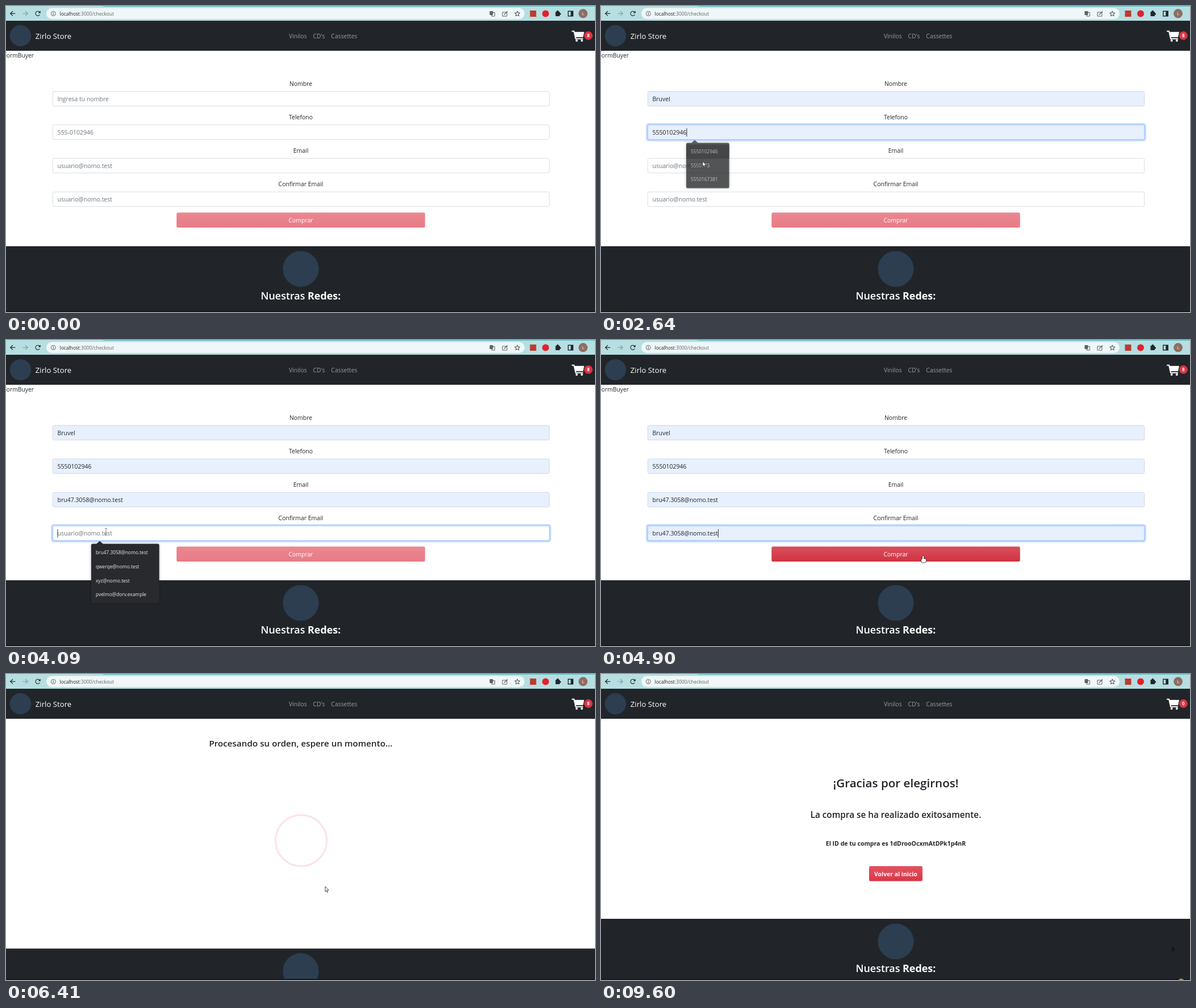
Recreate the animation shown at these times as an HTML page with a canvas. Size 1037 by 540 pixels, loop 9730 ms.

```html
<!DOCTYPE html>
<html lang="es">
<head>
<meta charset="utf-8">
<title>Checkout</title>
<style>
  html, body { margin: 0; width: 100%; height: 100%; overflow: hidden; background: #fff; }
  canvas { display: block; }
</style>
</head>
<body>
<canvas id="stage" width="1037" height="540"></canvas>
<script>
const ctx = document.getElementById('stage').getContext('2d');
const LOOP = 9730, WIDTH = 1037, HEIGHT = 540, CENTER = 519;
const FONT = '"Open Sans", "Noto Sans", sans-serif';
const DARK = '#212529', RED = '#dc3545', DISC = '#2c3e50', INK = '#20282b', SOFT = '#5f6368';
const LOADING_AT = 5400, DONE_AT = 6630, GONE_AT = 9400;
const INPUT = { x: 82, w: 875, h: 26.4 };
const MENU = { x: 150, row: 24.7, pad: 3, size: 8.35 };
const BUY = { x: 300.3, y: 364.5, w: 437.5, h: 26.5 };
const BACK = { x: 472, y: 339, w: 94, h: 26.5 };

const clamp = v => Math.max(0, Math.min(1, v));
const mix = (a, b, k) => a + (b - a) * k;
const between = (t, on, off, ms) => Math.min(clamp((t - on) / ms), 1 - clamp((t - off) / ms));
const inside = (p, b) => p.x >= b.x && p.x <= b.x + b.w && p.y >= b.y && p.y <= b.y + b.h;

function bezier(x1, y1, x2, y2) {
  const at = (s, a, b) => 3 * (1 - s) * (1 - s) * s * a + 3 * (1 - s) * s * s * b + s * s * s;
  return x => {
    let lo = 0, hi = 1;
    for (let i = 0; i < 24; i++) {
      const mid = (lo + hi) / 2;
      if (at(mid, x1, x2) < x) lo = mid; else hi = mid;
    }
    return at(lo, y1, y2);
  };
}
const growEase = bezier(0.165, 0.84, 0.44, 1);
const fadeEase = bezier(0.3, 0.61, 0.355, 1);

function rect(x, y, w, h, color, r = 0) {
  ctx.fillStyle = color;
  ctx.beginPath();
  ctx.roundRect(x, y, w, h, r);
  ctx.fill();
}

function frame(x, y, w, h, color, width, r = 0) {
  ctx.strokeStyle = color;
  ctx.lineWidth = width;
  ctx.beginPath();
  ctx.roundRect(x, y, w, h, r);
  ctx.stroke();
}

function circle(x, y, r, color) {
  ctx.fillStyle = color;
  ctx.beginPath();
  ctx.arc(x, y, r, 0, Math.PI * 2);
  ctx.fill();
}

function ring(x, y, r, color, width, from = 0, to = Math.PI * 2) {
  ctx.strokeStyle = color;
  ctx.lineWidth = width;
  ctx.beginPath();
  ctx.arc(x, y, r, from, to);
  ctx.stroke();
}

function trace(points, close) {
  ctx.beginPath();
  for (let i = 0; i < points.length; i += 2) ctx.lineTo(points[i], points[i + 1]);
  if (close) ctx.closePath();
}

function line(points, color, width = 1.2, close = false) {
  trace(points, close);
  ctx.strokeStyle = color;
  ctx.lineWidth = width;
  ctx.stroke();
}

function shape(points, color) {
  trace(points, true);
  ctx.fillStyle = color;
  ctx.fill();
}

// Draws a string and returns its width
function text(str, x, y, size, color, { align = 'left', weight = 400, font = FONT } = {}) {
  ctx.font = `${weight} ${size}px ${font}`;
  ctx.textAlign = align;
  ctx.fillStyle = color;
  ctx.fillText(str, x, y);
  return ctx.measureText(str).width;
}

const centered = (str, y, size, weight, color = DARK) =>
  text(str, CENTER, y, size, color, { align: 'center', weight });

function menuBox(options, inputY) {
  ctx.font = `${MENU.size}px ${FONT}`;
  const widest = Math.max(...options.map(o => ctx.measureText(o).width));
  return { x: MENU.x, y: inputY + 32, w: widest + 28, h: options.length * MENU.row + 2 * MENU.pad };
}

const mails = ['bru47.3058@nomo.test', 'qwerqe@nomo.test', 'xyz@nomo.test', 'pvelmo@dorv.example'];
const mailHint = 'usuario@nomo.test';

// Fields are filled one after another at a steady pace
const fields = [
  { label: 'Nombre', hint: 'Ingresa tu nombre', options: ['Bruvel', 'das', 'Nombre1', 'adasda'] },
  { label: 'Telefono', hint: '555-0102946', options: ['5550102946', '5550173', '5550167381'] },
  { label: 'Email', hint: mailHint, options: mails },
  { label: 'Confirmar Email', hint: mailHint, options: mails }
].map((f, i, all) => {
  const y = 150.4 + 59.1 * i, pick = 1540 + 1030 * i, focus = pick - 690;
  const blur = i < all.length - 1 ? focus + 1030 : LOOP;
  return { ...f, y, pick, focus, blur, box: { ...INPUT, y }, menu: menuBox(f.options, y) };
});
const lastPick = fields.at(-1).pick;

// Where the mouse rests: arrival, departure, x, y
const stops = [
  [140, 140, 795, 470], [360, 360, 480, 130], [590, 790, 296, 162],
  ...fields.flatMap((f, i) => [
    [i ? fields[i - 1].pick + 100 : f.focus + 150, f.focus + 150, 176, f.y + 10],
    [f.pick - 200, f.pick, 186, f.menu.y + 22]
  ]),
  [4900, 5300, 567, 381], [5580, DONE_AT, 562, 375], [7170, 7630, 588, 398],
  [8000, 8720, 522, 352], [GONE_AT, LOOP, 1005, 480]
];

function mouseAt(t) {
  const i = stops.findIndex(s => t < s[1]);
  const [arrive, , x, y] = stops[i];
  if (i === 0) return { x: -50, y: -50 };
  const [, leave, x0, y0] = stops[i - 1];
  const k = clamp((t - leave) / (arrive - leave));
  return { x: mix(x0, x, k), y: mix(y0, y, k) };
}

function chevron(x, dir, color) {
  line([x - 4.3 * dir, 13.3, x + 4.3 * dir, 13.3], color);
  line([x, 9.2, x + 4.3 * dir, 13.3, x, 17.4], color);
}

function drawStar(x, y, r) {
  const points = [];
  for (let i = 0; i < 10; i++) {
    const a = i * Math.PI / 5 - Math.PI / 2, d = i % 2 ? r * 0.43 : r;
    points.push(x + d * Math.cos(a), y + d * Math.sin(a));
  }
  line(points, '#3c4043', 1, true);
}

function drawBrowser() {
  rect(0, 0, WIDTH, 26, '#b7dee1');
  rect(171, 0, WIDTH - 171, 1, '#55b9c0');
  rect(71, 3.5, 842, 19.5, '#eff7f8', 9.75);

  chevron(12, -1, INK);
  chevron(34, 1, '#83a0a3');
  ring(56, 13.3, 3.9, INK, 1.2, 0.5, 5.6);
  shape([60.8, 8.6, 60.8, 12.6, 56.8, 12.6], INK);

  ring(83.3, 13.4, 4, SOFT, 1);
  text('i', 83.3, 16.1, 7, SOFT, { align: 'center', weight: 700 });
  const host = text('localhost', 94.5, 16.8, 8.45, '#202124');
  text(':3000/checkout', 94.5 + host, 16.8, 8.45, SOFT);

  frame(855, 11.5, 5.5, 6.5, SOFT, 1);
  rect(851.5, 9, 6, 7, SOFT, 1);
  frame(874, 11, 8, 7, SOFT, 1);
  line([877, 15.5, 883, 9.5], SOFT);
  drawStar(900.3, 13.8, 4.9);

  rect(922.5, 8, 11, 11, '#bd3a2f');
  circle(950, 13.4, 6, '#e2202c');
  rect(967.5, 10, 7.5, 8, INK, 1);
  circle(971.3, 9.6, 1.8, INK);
  circle(975.3, 14, 1.8, INK);
  frame(989.8, 9.3, 8.4, 8.4, INK, 1.4);
  rect(994.3, 9, 4, 9, INK);
  circle(1016, 13.3, 8, '#8d6e63');
  text('L', 1016, 16.4, 8, '#fff', { align: 'center' });
}

function drawNavbar(count) {
  rect(0, 26, WIDTH, 53, DARK);
  circle(25.5, 52.5, 18.7, DISC);
  text('Zirlo Store', 51.8, 58.2, 13.2, '#fff');
  let x = 498;
  for (const link of ['Vinilos', 'CD\'s', 'Cassettes']) x += text(link, x, 57.2, 10.4, '#9b9d9f') + 10.8;

  line([996, 44.4, 1000, 44.4, 1003, 57.8, 1016, 57.8], '#fff', 2);
  shape([1000.5, 45.8, 1018, 45.8, 1016, 55, 1002.4, 55], '#fff');
  circle(1004.7, 61, 2, '#fff');
  circle(1013.8, 61, 2, '#fff');
  circle(1025.3, 52.3, 7.5, RED);
  text(count, 1025.3, 55.3, 8, '#fff', { align: 'center', weight: 700 });
}

function drawFooter(y) {
  rect(0, y, WIDTH, HEIGHT - y, DARK);
  circle(CENTER, y + 40, 31.6, DISC);
  const w = text('Nuestras ', 448.5, y + 93.5, 17.9, '#fff', { weight: 600 });
  text('Redes:', 448.5 + w, y + 93.5, 17.9, '#fff', { weight: 700 });
}

function drawButton({ x, y, w, h }, label, weight, hover, enabled = true) {
  ctx.globalAlpha = enabled ? 1 : 0.65;
  rect(x, y, w, h, RED, 2.8);
  rect(x, y, w, h, `rgba(0,0,0,${0.15 * hover})`, 2.8);
  const shine = ctx.createLinearGradient(0, y, 0, y + h);
  shine.addColorStop(0, 'rgba(255,255,255,.15)');
  shine.addColorStop(1, 'rgba(255,255,255,0)');
  rect(x, y, w, h, shine, 2.8);
  ctx.globalAlpha = 1;
  centered(label, y + 17.6, 10.4, weight, '#fff');
}

const menuAlpha = (f, t) => t < f.focus + 90 ? 0 : 1 - clamp((t - f.pick) / 250);

// Highlighted option; a picked one stays lit while the list fades
function activeRow(f, t, mouse) {
  if (t >= f.pick) return 0;
  if (!menuAlpha(f, t) || !inside(mouse, f.menu)) return -1;
  const row = Math.floor((mouse.y - f.menu.y - MENU.pad) / MENU.row);
  return row < f.options.length ? row : -1;
}

function drawField(f, t, mouse) {
  const { x, y, w, h } = f.box;
  const focus = between(t, f.focus, f.blur, 150);
  const picked = t >= f.pick, row = activeRow(f, t, mouse);
  const left = x + 8.5, base = y + 17.2;
  centered(f.label, y - 9.4, 10.45, 400);
  if (focus > 0) rect(x - 2.8, y - 2.8, w + 5.6, h + 5.6, `rgba(13,110,253,${0.25 * focus})`, 5);
  rect(x, y, w, h, row >= 0 ? '#e8f0fe' : '#fff', 2.8);
  frame(x + 0.35, y + 0.35, w - 0.7, h - 0.7, focus > 0.5 ? '#86b7fe' : '#ced4da', 0.8, 2.6);

  let width = 0;
  if (picked) width = text(f.options[0], left, base, 10.5, DARK);
  else if (row >= 0) text(f.options[row], left, base, 9.3, '#000', { font: '"Liberation Sans", sans-serif' });
  else text(f.hint, left, base, 10.5, '#6c757d');

  const age = t - (picked ? f.pick : f.focus);
  const typing = t >= f.focus && t < f.blur && (picked || row < 0);
  if (typing && age % 1000 < 500) rect(left + width, y + 6, 0.9, 15, DARK);
}

function drawMenu(f, t, mouse) {
  const alpha = menuAlpha(f, t);
  if (!alpha) return;
  const { x, y, w, h } = f.menu, row = activeRow(f, t, mouse);
  ctx.globalAlpha = alpha;
  ctx.shadowColor = 'rgba(0,0,0,.35)';
  ctx.shadowBlur = 4;
  rect(x, y, w, h, '#292a2d', 2.5);
  ctx.shadowColor = 'transparent';
  shape([x + 9, y + 0.3, x + 15, y - 5, x + 21, y + 0.3], '#292a2d');
  if (row >= 0) rect(x, y + MENU.pad + row * MENU.row, w, MENU.row, '#404144');
  f.options.forEach((o, i) => text(o, x + 8, y + 18.4 + i * MENU.row, MENU.size, '#e8eaed'));
  ctx.globalAlpha = 1;
}

function drawForm(t, mouse) {
  text('FormBuyer', 49, 91.3, 10.3, DARK, { align: 'right' });
  fields.forEach(f => drawField(f, t, mouse));
  drawButton(BUY, 'Comprar', 400, between(t, 4850, LOOP, 150), t >= lastPick);
  drawFooter(424);
  fields.forEach(f => drawMenu(f, t, mouse));
}

// Two rings, half a cycle apart, grow and fade
function drawLoading(t) {
  centered('Procesando su orden, espere un momento...', 128.2, 15.2, 600);
  for (const lead of [0, 1000]) {
    const p = (t - LOADING_AT + lead) % 2000 / 2000, scale = growEase(p);
    if (scale > 0.03) ring(519.5, 294, 49.2 * scale, `rgba(220,53,69,${1 - fadeEase(p)})`, 3.5 * scale);
  }
  drawFooter(484.4);
}

function drawThanks(t) {
  centered('¡Gracias por elegirnos!', 199.6, 20.6, 600);
  centered('La compra se ha realizado exitosamente.', 253.5, 15.3, 600);
  centered('El ID de tu compra es 1dDrooOcxmAtDPk1p4nR', 302.6, 10.55, 700);
  drawButton(BACK, 'Volver al inicio', 700, between(t, 7890, 8785, 150));
  drawFooter(432);
  ctx.globalAlpha = between(t, 7950, 8860, 200);
  rect(0, 522.5, 346, 16, '#e3f1f2', [0, 3, 0, 0]);
  text('localhost:3000', 5, 533.6, 8.3, '#4d5558');
  ctx.globalAlpha = 1;
}

function cursorKind(t, mouse) {
  if (t >= DONE_AT) return inside(mouse, BACK) ? 'hand' : 'arrow';
  if (t >= LOADING_AT || fields.some(f => menuAlpha(f, t) && inside(mouse, f.menu))) return 'arrow';
  if (t >= lastPick && inside(mouse, BUY)) return 'hand';
  return fields.some(f => inside(mouse, f.box)) ? 'beam' : 'arrow';
}

function drawCursor(t, mouse) {
  const kind = cursorKind(t, mouse), gone = t >= GONE_AT;
  const fill = gone ? '#15171a' : '#fff', edge = gone ? '#1b1e21' : '#222';
  ctx.save();
  ctx.translate(mouse.x, mouse.y);
  if (kind === 'beam') {
    rect(-0.4, -5.5, 0.9, 11, '#777');
    for (const y of [-5.9, 5.1]) rect(-2, y, 4, 0.9, '#777');
  } else if (kind === 'hand') {
    frame(-3, 5, 8.2, 6.8, edge, 1.4, 2.5);
    frame(-1, 0, 2.2, 8, edge, 1.4, 1);
    rect(-3, 5, 8.2, 6.8, fill, 2.5);
    rect(-1, 0, 2.2, 8, fill, 1);
  } else {
    const outline = [0, 0, 0, 9, 2, 7.2, 3.4, 10.4, 4.8, 9.7, 3.4, 6.7, 6.2, 6.4];
    shape(outline, fill);
    line(outline, edge, 0.8, true);
  }
  ctx.restore();
}

function draw(t) {
  const mouse = mouseAt(t);
  rect(0, 0, WIDTH, HEIGHT, '#fff');
  if (t < LOADING_AT) drawForm(t, mouse);
  else if (t < DONE_AT) drawLoading(t);
  else drawThanks(t);
  drawBrowser();
  drawNavbar(t < DONE_AT ? '8' : '0');
  rect(0, 538, WIDTH, 2, '#18191c');
  if (t >= 9600) circle(1021.5, 543, 5.5, '#a3a52c');
  drawCursor(t, mouse);
}

function tick(now) {
  draw(now % LOOP);
  requestAnimationFrame(tick);
}
requestAnimationFrame(tick);
</script>
</body>
</html>
```
